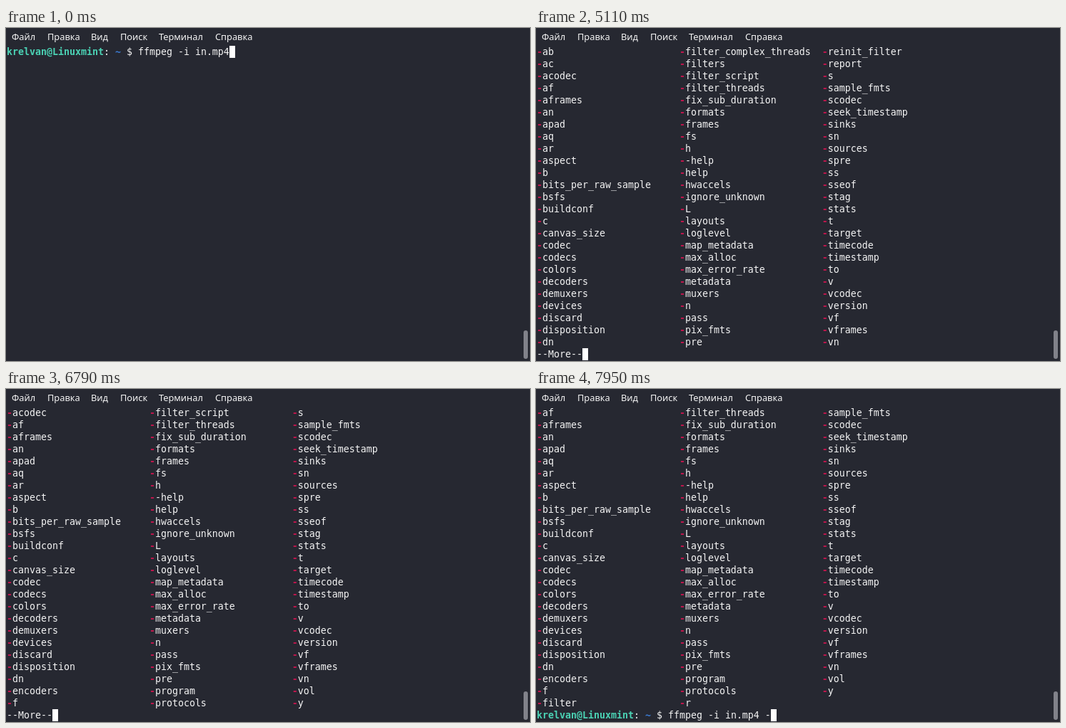
Animation, 734 px wide and 468 px high, one loop 8000 ms. Source, as an HTML page:

```html
<!DOCTYPE html>
<html lang="ru">
<head>
<meta charset="utf-8">
<title>Terminal</title>
<style>
  html, body { margin: 0; width: 100%; height: 100%; overflow: hidden; background: #262831; }
  #stage { position: relative; width: 734px; height: 468px; overflow: hidden; color: #f4f4f4; }
  #menu span { position: absolute; top: 3px; font: 12.8px/18px "Noto Sans", sans-serif; white-space: nowrap; }
  #screen {
    position: absolute; left: 1px; top: 25px; margin: 0;
    /* this size gives cells 8px wide */
    font: 13.29px/17px "DejaVu Sans Mono", monospace;
    font-variant-ligatures: none;
  }
  #screen b { color: #4bd3b5; }
  #screen b.path { color: #3b7bd2; }
  #screen b.dash { color: #bd174d; }
  #cursor { position: absolute; width: 8px; height: 17px; background: #fff; }
  #scrollbar { position: absolute; left: 725px; top: 425px; width: 6px; height: 40px; border-radius: 3px; background: #81828a; }
</style>
</head>
<body>
<div id="stage">
  <div id="menu"></div>
  <pre id="screen"></pre>
  <div id="cursor"></div>
  <div id="scrollbar"></div>
</div>
<script>
const LOOP = 8000, CELL = 8, LINE = 17, PAGE = 25, COLUMN = 25;

const menu = [['Файл', 8], ['Правка', 58], ['Вид', 119], ['Поиск', 160], ['Терминал', 214], ['Справка', 293]];

const columns = [
  `ab ac acodec af aframes an apad aq ar aspect b bits_per_raw_sample bsfs buildconf c
   canvas_size codec codecs colors decoders demuxers devices discard disposition dn
   encoders f filter`,
  `filter_complex_threads filters filter_script filter_threads fix_sub_duration formats
   frames fs h -help help hwaccels ignore_unknown L layouts loglevel map_metadata max_alloc
   max_error_rate metadata muxers n pass pix_fmts pre program protocols r`,
  `reinit_filter report s sample_fmts scodec seek_timestamp sinks sn sources spre ss sseof
   stag stats t target timecode timestamp to v vcodec version vf vframes vn vol y`
].map(names => names.split(/\s+/));

const user = 'krelvan@Linuxmint';
const more = { html: '--More--', length: 8 };

function prompt(command) {
  return {
    html: `<b>${user}</b>: <b class="path">~</b> $ ${command}`,
    length: user.length + 6 + command.length
  };
}

function option(name) {
  return name ? '<b class="dash">-</b>' + name + ' '.repeat(COLUMN - 1 - name.length) : '';
}

function optionRow(index) {
  return columns.map(names => option(names[index])).join('');
}

function page(first, lastLine) {
  const rows = Array.from({ length: PAGE }, (_, i) => optionRow(first + i));
  return { rows, lastLine };
}

const command = 'ffmpeg -i in.mp4';
const states = [
  [0, { rows: [], lastLine: prompt(command) }],
  [470, { rows: [], lastLine: prompt(command + ' ') }],
  [1320, { rows: [], lastLine: prompt(command + ' -') }],
  [3680, page(0, more)],
  [5630, page(1, more)],
  [6630, page(2, more)],
  [7470, page(3, prompt(command + ' -'))]
];

const screenEl = document.getElementById('screen');
const cursorEl = document.getElementById('cursor');
document.getElementById('menu').innerHTML =
  menu.map(([label, x]) => `<span style="left:${x}px">${label}</span>`).join('');

let shown;
function show(state) {
  if (state === shown) return;
  shown = state;
  const { rows, lastLine } = state;
  screenEl.innerHTML = [...rows, lastLine.html].join('\n');
  cursorEl.style.left = 1 + lastLine.length * CELL + 'px';
  cursorEl.style.top = 25 + rows.length * LINE + 'px';
}

const start = performance.now();
function frame() {
  const time = (performance.now() - start) % LOOP;
  show(states.findLast(([from]) => from <= time)[1]);
  requestAnimationFrame(frame);
}
frame();
</script>
</body>
</html>
```
